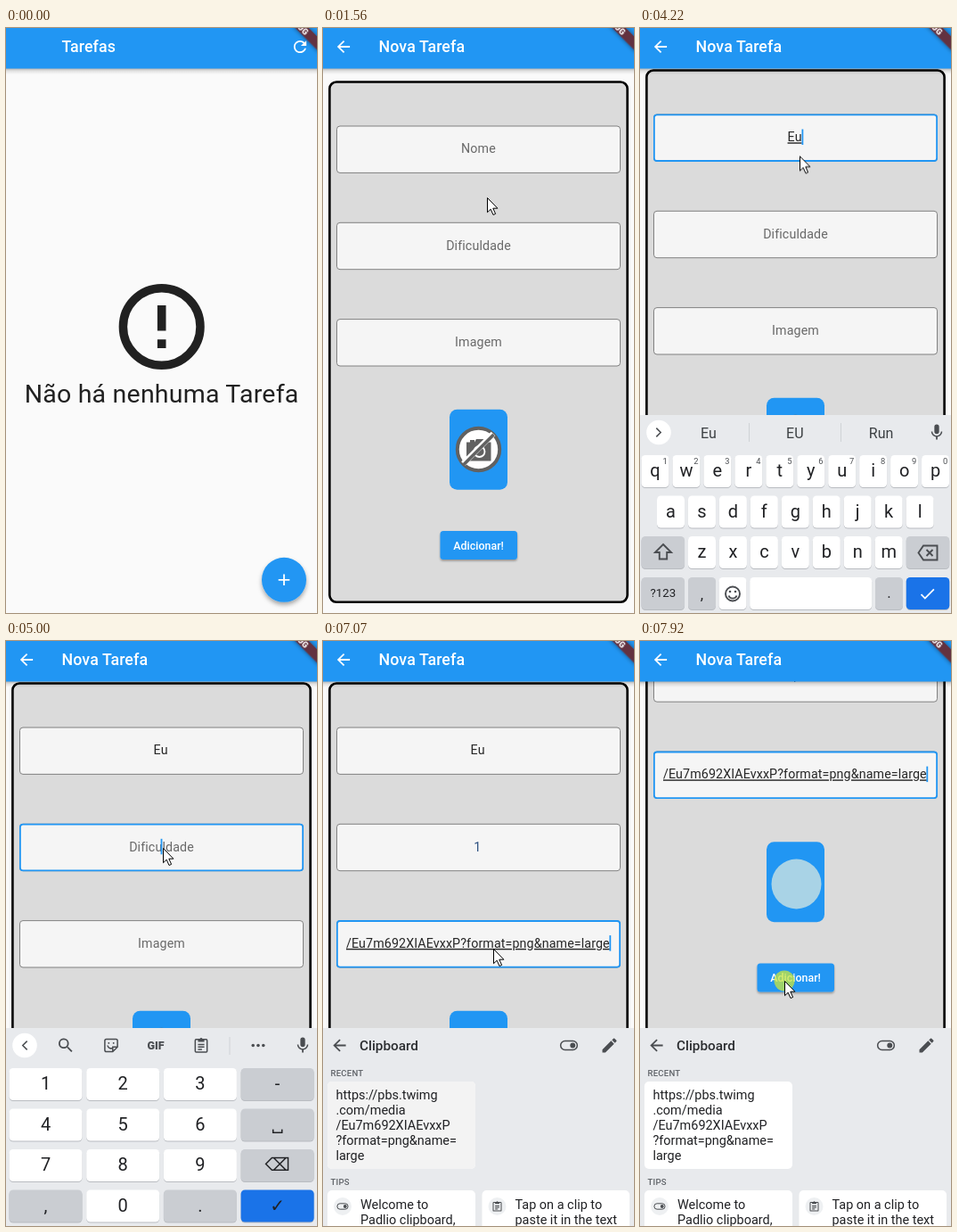
An HTML page that plays this animation: 349x656 px, repeating every 7.99 s.

```html
<!DOCTYPE html>
<html lang="pt">
<head>
<meta charset="utf-8">
<title>Tarefas</title>
<style>
@property --t { syntax: '<number>'; inherits: true; initial-value: 0; }
html, body { margin: 0; width: 100%; height: 100%; overflow: hidden; background: #fafafa; }
#stage {
  --loop: 7990ms;
  display: block; width: 349px; height: 656px;
  font-family: Roboto, "Noto Sans", sans-serif;
  animation: clock var(--loop) linear infinite;
}
@keyframes clock { to { --t: 7990; } }

/* visible from --a to --b (ms), fading over --f */
.on {
  --a: -9999; --b: 99999; --f: 1;
  opacity: clamp(0, min((var(--t) - var(--a) + 1) / var(--f), (var(--b) - var(--t)) / var(--f)), 1);
}
#form, #scroll, #keyboard, #pointer { animation: var(--loop) infinite; }
#form { animation-name: enter; }
#scroll { animation-name: scroll; }
#keyboard { animation-name: rise; }
#pointer { animation-name: point; }

@keyframes enter {
  0%, 11.8% { transform: translateY(164px); animation-timing-function: cubic-bezier(.2, .7, .2, 1); }
  15.6%, 100% { transform: none; }
}
@keyframes scroll {
  0%, 27.6% { transform: none; }
  29.2%, 90.2% { transform: translateY(-13px); animation-timing-function: ease-in; }
  93.9% { transform: translateY(-165px); animation-timing-function: ease-out; }
  96.4%, 100% { transform: translateY(-202.5px); }
}
@keyframes rise {
  0%, 25% { transform: translateY(224px); animation-timing-function: ease-out; }
  28.2%, 100% { transform: none; }
}
@keyframes point {
  0%, 1.2% { transform: translate(318px, 660px); }
  5.88%, 15.7% { transform: translate(318px, 622px); }
  19.4%, 20.3% { transform: translate(184px, 190px); }
  23.1%, 52.2% { transform: translate(179px, 140px); }
  52.8% { transform: translate(179px, 143px); }
  55.6%, 65% { transform: translate(176px, 232px); }
  67.9%, 69.6% { transform: translate(172px, 338px); }
  72.05% { transform: translate(87px, 427px); }
  73.9%, 78.2% { transform: translate(66px, 451px); }
  82.6%, 85.7% { transform: translate(90px, 545px); }
  88.4%, 90.2% { transform: translate(191px, 345px); }
  93.9%, 94.8% { transform: translate(191px, 200px); }
  98.2%, 100% { transform: translate(162px, 381px); }
}

.mid { text-anchor: middle; }
.title { font-size: 17.78px; font-weight: 500; letter-spacing: .13px; fill: #fff; }
.body { font-size: 14.22px; letter-spacing: .13px; fill: #262626; }
.hint { fill: #696969; }
.typing { text-decoration: underline .9px; text-decoration-skip-ink: none; }
.box { fill: #f5f5f5; stroke: #7c7c7c; stroke-width: .95; }
.focus { fill: none; stroke: #2196f3; stroke-width: 1.8; }
.blue, .caret { fill: #2196f3; }
.white { fill: #fff; }
.ink { fill: #4a4d51; }
.line { fill: none; stroke: #4a4d51; stroke-width: 1.7; }
.word { font-size: 16px; fill: #3c4043; text-anchor: middle; }
.clip { font-size: 14.45px; fill: #202124; }
.head { font-size: 9.6px; font-weight: 500; letter-spacing: .2px; fill: #5f6368; }
.key { font-size: 20px; fill: #202124; text-anchor: middle; }
.num { font-size: 9.3px; fill: #4a4d51; text-anchor: middle; }
</style>
</head>
<body>
<svg id="stage" viewBox="0 0 349 656">
<defs>
  <linearGradient id="shade" x2="0" y2="1">
    <stop stop-opacity=".3"/><stop offset=".45" stop-opacity=".1"/><stop offset="1" stop-opacity="0"/>
  </linearGradient>
  <filter id="lift" x="-30%" y="-30%" width="160%" height="170%">
    <feDropShadow dx="0" dy="3" stdDeviation="2.6" flood-opacity=".35"/>
  </filter>
  <filter id="low" x="-10%" y="-20%" width="120%" height="160%">
    <feDropShadow dx="0" dy="1.6" stdDeviation="1.2" flood-opacity=".35"/>
  </filter>
  <filter id="glow" x="-20%" y="-100%" width="140%" height="300%">
    <feDropShadow dx="0" dy="0" stdDeviation="2.4" flood-opacity=".5"/>
  </filter>
  <g id="bar">
    <rect y="45" width="349" height="7" fill="url(#shade)"/>
    <rect class="blue" width="349" height="45.5"/>
  </g>
  <rect id="field" x="15.5" width="318" height="52.4" rx="3.5"/>
  <rect id="ring" x="15.9" y=".4" width="317.2" height="51.6" rx="3.1"/>
  <rect id="caret" x="-.9" y="-13.5" width="1.8" height="17.5"/>

  <!-- 24-unit icons centred on the origin -->
  <path id="back" transform="translate(-12 -12)" d="M20 11H7.83l5.59-5.59L12 4l-8 8 8 8 1.41-1.41L7.83 13H20z"/>
  <path id="reload" transform="translate(-12 -12)" d="M17.65 6.35C16.2 4.9 14.21 4 12 4c-4.42 0-7.99 3.58-7.99 8s3.57 8 7.99 8c3.73 0 6.84-2.55 7.73-6h-2.08c-.82 2.33-3.04 4-5.65 4-3.31 0-6-2.69-6-6s2.69-6 6-6c1.66 0 3.14.69 4.22 1.78L13 11h7V4z"/>
  <path id="search" transform="translate(-12 -12)" d="M15.5 14h-.79l-.28-.27A6.5 6.5 0 1 0 13.73 14.43l.27.28v.79l5 4.99L20.49 19zM9.5 14a4.5 4.5 0 1 1 0-9 4.5 4.5 0 0 1 0 9z"/>
  <path id="mic" transform="translate(-12 -12)" d="M12 14a3 3 0 0 0 3-3V5a3 3 0 0 0-6 0v6a3 3 0 0 0 3 3zm5.3-3c0 3-2.54 5.1-5.3 5.1S6.7 14 6.7 11H5c0 3.41 2.72 6.23 6 6.72V21h2v-3.28c3.28-.48 6-3.3 6-6.72z"/>
  <path id="check" transform="translate(-12 -12)" d="M9 16.17L4.83 12l-1.42 1.41L9 19 21 7l-1.41-1.41z"/>
  <path id="pencil" transform="translate(-12 -12)" d="M3 17.25V21h3.75L17.81 9.94l-3.75-3.75zM20.71 7.04a1 1 0 0 0 0-1.41l-2.34-2.34a1 1 0 0 0-1.41 0l-1.83 1.83 3.75 3.75z"/>
  <g id="palette">
    <path class="ink" transform="translate(-12 -12)" d="M12 3a9 9 0 0 0 0 18c.83 0 1.5-.67 1.5-1.5 0-.39-.15-.74-.39-1-.23-.27-.38-.62-.38-1 0-.83.67-1.5 1.5-1.5H16a5 5 0 0 0 5-5c0-4.42-4.03-8-9-8z"/>
    <path d="M-5.5-1.5h0M-2.5-5.500h0M2.5-5.500h0M5.5-1.5h0" stroke="#e8eaed" stroke-width="3" stroke-linecap="round"/>
  </g>
  <g id="board">
    <rect class="line" x="-7.5" y="-7.5" width="15" height="16" rx="1.2"/>
    <path class="ink" d="M-4-8.5h2.3a2 2 0 0 1 3.4 0h2.3v4h-8z"/>
    <path class="line" d="M-4-1h8M-4 2h8M-4 5h5"/>
  </g>
  <g id="gear" fill="none" stroke="#4a4d51">
    <circle r="5" stroke-width="3.6"/><circle r="7.6" stroke-width="2.6" stroke-dasharray="3.4 4.56"/>
  </g>
  <g id="sticker" class="line">
    <path d="M8 2V-6a2 2 0 0 0-2-2H-6a2 2 0 0 0-2 2V6a2 2 0 0 0 2 2H2zH2V8"/>
    <path d="M-4.5 0a4.5 4.5 0 0 0 6 3.5M-3-4v2M3-4v2"/>
  </g>
  <g id="onehand">
    <path class="line" d="M7.5-1V-7.5H-7.5V7.500H0"/>
    <path class="ink" d="M-3-2h2.500l3 3 5.500 1v7H3L-1 5l3-1z"/>
  </g>
  <g id="dots" class="ink"><circle cx="-6.5" r="2"/><circle r="2"/><circle cx="6.5" r="2"/></g>
  <g id="toggle">
    <rect class="line" x="-10.5" y="-5.5" width="21" height="11" rx="5.5"/><circle class="ink" cx="4.8" r="3.3"/>
  </g>
  <g id="chev"><circle class="white" r="15.5"/><path class="line" d="M3-5.5L-2.5 0 3 5.5"/></g>
</defs>

<!-- empty list -->
<rect width="349" height="656" fill="#fafafa"/>
<g fill="#212121">
  <circle cx="174.7" cy="335" r="43.3" fill="none" stroke="#212121" stroke-width="9.5"/>
  <path d="M169.9 311h9.6v28.6h-9.6zM169.9 349.3h9.6v9.6h-9.6z"/>
  <text class="mid" x="174.6" y="419.5" font-size="28.5" letter-spacing=".22">Não há nenhuma Tarefa</text>
</g>
<use href="#bar"/>
<text class="title" x="62.5" y="27.4">Tarefas</text>
<use href="#reload" class="white" transform="translate(330 21) scale(.889)"/>
<circle class="blue" cx="312" cy="618.8" r="25" filter="url(#lift)"/>
<path d="M305.7 618.8h12.6M312 612.5v12.6" stroke="#fff" stroke-width="1.8"/>
<circle class="white on" cx="312" cy="618.8" r="25" style="--a:860;--b:1100;--f:600"/>

<!-- new task -->
<g class="on" style="--a:930;--f:200"><g id="form">
  <rect width="349" height="900" fill="#fafafa"/>
  <g id="scroll">
    <rect x="7.4" y="60.5" width="334.2" height="583.2" rx="7.6" fill="#dbdbdb" stroke="#000" stroke-width="2.6"/>
    <use href="#field" class="box" y="110"/>
    <use href="#field" class="box" y="218.3"/>
    <use href="#field" class="box" y="326.6"/>
    <use href="#ring" class="focus on" y="110" style="--a:1900;--b:4545"/>
    <use href="#ring" class="focus on" y="218.3" style="--a:4545;--b:5535"/>
    <use href="#ring" class="focus on" y="326.6" style="--a:5535"/>

    <g class="body mid">
      <text class="hint on" x="174.5" y="140.3" style="--b:2620;--f:180">Nome</text>
      <text class="hint on" x="174.5" y="248.6" style="--b:5290;--f:180">Dificuldade</text>
      <text class="hint on" x="174.5" y="356.9" style="--b:6940;--f:160">Imagem</text>
      <text class="typing on" x="173.6" y="140.3" style="--a:2455;--b:2595">E</text>
      <text class="typing on" x="173.6" y="140.3" style="--a:2595;--b:2735">Eu</text>
      <text class="on" x="173.6" y="140.3" style="--a:2735;--b:3880">Eu</text>
      <text class="typing on" x="173.6" y="140.3" style="--a:3880;--b:4545">Eu</text>
      <text class="on" x="173.6" y="140.3" style="--a:4545">Eu</text>
      <text class="on" x="173.4" y="248.6" fill="#2c5080" style="--a:5120">1</text>
    </g>
    <text class="body typing on" x="321.8" y="356.9" text-anchor="end" style="--a:6800">/Eu7m692XIAEvxxP?format=png&amp;name=large</text>

    <g class="caret">
      <use href="#caret" class="on" x="174.5" y="140" style="--a:1960;--b:2455"/>
      <use href="#caret" class="on" x="178.5" y="140" style="--a:2455;--b:2595"/>
      <use href="#caret" class="on" x="182.4" y="140" style="--a:2595;--b:2735"/>
      <use href="#caret" class="on" x="186.4" y="140" style="--a:2735;--b:3270"/>
      <use href="#caret" class="on" x="186.4" y="140" style="--a:3800;--b:3880"/>
      <use href="#caret" class="on" x="182.4" y="140" style="--a:3880;--b:4545"/>
      <use href="#caret" class="on" x="174.5" y="248.3" style="--a:4560;--b:5120"/>
      <use href="#caret" class="on" x="178" y="248.3" style="--a:5120;--b:5535"/>
      <use href="#caret" class="on" x="174.5" y="356.6" style="--a:5535;--b:5690"/>
      <use href="#caret" class="on" x="174.5" y="356.6" style="--a:6240;--b:6800"/>
      <use href="#caret" class="on" x="322.3" y="356.6" style="--a:6800"/>
    </g>

    <rect class="blue" x="142" y="427.7" width="65" height="90" rx="8.5"/>
    <g class="on" style="--b:6870">
      <circle cx="174.5" cy="472.5" r="23.7" fill="#fff" stroke="#616161" stroke-width="4"/>
      <path d="M161 464.5h4v-2.5h5v2.5l2-3.5h8l2 3.5h6.5v21H161z" fill="#616161"/>
      <circle cx="175.5" cy="475" r="6" fill="#616161" stroke="#fff" stroke-width="1.8"/>
      <path d="M191 455L157.5 488.5" stroke="#fff" stroke-width="6.5"/>
      <path d="M191.5 456L158 489.5" stroke="#616161" stroke-width="3.8"/>
    </g>
    <circle class="on" cx="175.5" cy="475" r="28" fill="#a9d3e6" style="--a:6870"/>

    <rect class="blue" x="131.5" y="564" width="86.5" height="32" rx="3.5" filter="url(#low)"/>
    <text class="white mid" x="174.6" y="584.6" font-size="12.44" font-weight="500">Adicionar!</text>
  </g>
  <use href="#bar"/>
  <use href="#back" class="white" transform="translate(23 21) scale(.889)"/>
  <text class="title" x="62.5" y="27.4">Nova Tarefa</text>
</g></g>

<!-- soft keyboard -->
<g class="on" style="--a:1980"><g id="keyboard">
  <rect y="434" width="349" height="222" fill="#e8eaed"/>
  <g id="alpha"></g>
  <text class="key on" x="69.5" y="641" style="--b:5580;font-size:17px">,</text>
  <text class="key on" x="69.5" y="640" style="--a:5580;font-size:15px">/</text>
  <g class="line" style="stroke-width:1.9">
    <path d="M26 579l9 9h-4.8v7.5h-8.4v-7.5H17z"/>
    <path d="M318 580.5h15.5v16H318l-5.5-8zM321.5 585l7 7m0-7l-7 7"/>
    <circle cx="104" cy="634.5" r="8"/>
    <path d="M99.5 636.5a4.8 4.8 0 0 0 9 0"/>
  </g>
  <g class="ink"><circle cx="101" cy="632" r="1.3"/><circle cx="107" cy="632" r="1.3"/></g>
  <use href="#check" class="white" transform="translate(322.5 634.5) scale(.889)"/>
  <g id="pad" class="on" style="--a:4630;--b:5580"></g>

  <g class="on tools" style="--b:2525"></g>
  <g class="on tools" style="--a:4630;--b:5580"></g>
  <g class="on" style="--a:5580">
    <use href="#chev" transform="translate(21 453.5) scale(.889)"/>
    <use href="#board" transform="translate(67 453.5) scale(.889)"/>
    <use href="#gear" transform="translate(118 453.5) scale(.889)"/>
    <use href="#palette" transform="translate(169 453.5) scale(.889)"/>
    <use href="#onehand" transform="translate(220 453.5) scale(.889)"/>
    <path d="M251 444v20" stroke="#cfd2d6"/>
    <use href="#dots" transform="translate(283 453.5) scale(.889)"/>
  </g>
  <g class="on" style="--a:2525;--b:4630">
    <use href="#chev" transform="translate(21 453.5) scale(-.889 .889)"/>
    <path d="M122.5 443v21M225.5 443v21" stroke="#cfd2d6"/>
  </g>
  <g class="on word" data-words="Eu EU Run" style="--a:2525;--b:2735"></g>
  <g class="on word" data-words="is the and" style="--a:2735;--b:3880"></g>
  <g class="on word" data-words="Eu EU Run" style="--a:3880;--b:4630"></g>
  <use href="#mic" class="ink" transform="translate(333 453.5) scale(.889)"/>

  <!-- clipboard -->
  <g class="on" style="--a:6080;--f:120">
    <rect y="434" width="349" height="222" fill="#e8eaed"/>
    <use href="#back" class="ink" transform="translate(18.5 453.5) scale(.889)"/>
    <text x="41" y="459" font-size="15.3" font-weight="500" fill="#2b2d30">Clipboard</text>
    <use href="#toggle" transform="translate(276 453.5) scale(.889)"/>
    <use href="#pencil" class="ink" transform="translate(321.5 453.5) scale(.889)"/>
    <text class="head" x="8.5" y="487.5">RECENT</text>
    <text class="head" x="8.5" y="609.5">TIPS</text>
    <g class="white">
      <rect x="5" y="494" width="166" height="98" rx="5"/>
      <rect x="5" y="616" width="166" height="60" rx="5"/>
      <rect x="178.5" y="616" width="165.5" height="60" rx="5"/>
    </g>
    <rect class="on" x="5" y="494" width="166" height="98" rx="5" fill="#f3f3f3" style="--a:6770;--b:7330;--f:90"/>
    <g id="clipText" class="clip"></g>
    <circle cx="22" cy="634" r="10" fill="#eef0f2"/><circle cx="195.5" cy="634" r="10" fill="#eef0f2"/>
    <use href="#toggle" transform="translate(22 634) scale(.58)"/>
    <use href="#board" transform="translate(195.5 634) scale(.6)"/>
    <g class="clip">
      <text x="42" y="637">Welcome to</text><text x="42" y="653.5">Padlio clipboard,</text>
      <text x="215.5" y="637">Tap on a clip to</text><text x="215.5" y="653.5">paste it in the text</text>
    </g>
  </g>
</g></g>

<!-- debug ribbon -->
<g transform="translate(349 -26) rotate(45)">
  <rect x="-40" y="24.9" width="80" height="10.7" fill="#64303f" filter="url(#glow)"/>
  <text class="white mid" y="33.6" font-size="9.3" font-weight="900">DEBUG</text>
</g>

<g id="pointer">
  <g id="taps" fill="#c8e63c" fill-opacity=".75"></g>
  <path d="M.5.5v16.2l3.7-3.5 2.8 6.3 2.6-1.1-2.8-6.2h5.1z" fill="#fff" stroke="#000"/>
</g>
</svg>
<script>
const $ = id => document.getElementById(id);
const each = (css, fn) => document.querySelectorAll(css).forEach(fn);
const icon = (id, x) => `<use href="#${id}" class="ink" transform="translate(${x} 453.5) scale(.889)"/>`;

const key = (cx, y, w, label = '', fill = '#fff', size = 20) =>
  `<rect x="${cx - w / 2}" y="${y + 1}" width="${w}" height="36" rx="4.5" fill="#b9bcc1"/>
   <rect x="${cx - w / 2}" y="${y}" width="${w}" height="36" rx="4.5" fill="${fill}"/>
   <text class="key" x="${cx}" y="${y + 18 + size * .3}" style="font-size:${size}px">${label}</text>`;

const grey = '#cacdd2', pitch = 34.95;
const row = (letters, x, y) => [...letters].map((c, i) => key(x + i * pitch, y, 31, c)).join('');
const digits = [...'1234567890'].map((d, i) =>
  `<text class="num" x="${28 + i * pitch}" y="489">${d}</text>`).join('');

$('alpha').innerHTML = row('qwertyuiop', 17, 479) + digits
  + row('asdfghjkl', 34.5, 524.5) + row('zxcvbnm', 69.5, 570)
  + key(25.8, 570, 48.5, '', grey) + key(323, 570, 48.5, '', grey)
  + key(25.8, 616, 48.5, '?123', grey, 13.3) + key(69.5, 616, 31, '', grey)
  + key(104, 616, 31) + key(191.7, 616, 137)
  + key(279.5, 616, 31, '.', grey, 17) + key(323, 616, 48.5, '', '#1a73e8');

$('pad').innerHTML = '<rect y="474" width="349" height="182" fill="#e8eaed"/>'
  + ['123-', '456␣', '789⌫', ',0.✓'].map((r, j) => [...r].map((c, i) =>
    key(44.5 + i * 86.7, 479 + j * 45.5, 82, c,
      c === '✓' ? '#1a73e8' : i === 3 || ',.'.includes(c) ? grey : '#fff')).join('')).join('');

each('.tools', g => g.innerHTML = icon('chev', 21)
  + icon('search', 67) + icon('sticker', 118) + icon('board', 219) + icon('dots', 283)
  + '<text class="ink mid" x="168" y="458" font-size="12.5" font-weight="900">GIF</text>'
  + '<path d="M251 444v20" stroke="#cfd2d6"/>');
each('.word', g => g.innerHTML = g.dataset.words.split(' ').map((w, i) =>
  `<text x="${77 + i * 96.8}" y="460">${w}</text>`).join(''));

$('clipText').innerHTML = ['https://pbs.twimg', '.com/media', '/Eu7m692XIAEvxxP', '?format=png&amp;name=', 'large']
  .map((s, i) => `<text x="14.5" y="${514 + i * 17.1}">${s}</text>`).join('');

// press intervals in ms
$('taps').innerHTML = [[860, 1000], [1850, 1960], [4480, 4590], [5450, 5560], [5955, 6070], [6770, 6850], [7200, 7500], [7900, 9999]]
  .map(([a, b]) => `<circle class="on" r="11.5" style="--a:${a};--b:${b}"/>`).join('');
</script>
</body>
</html>
```
